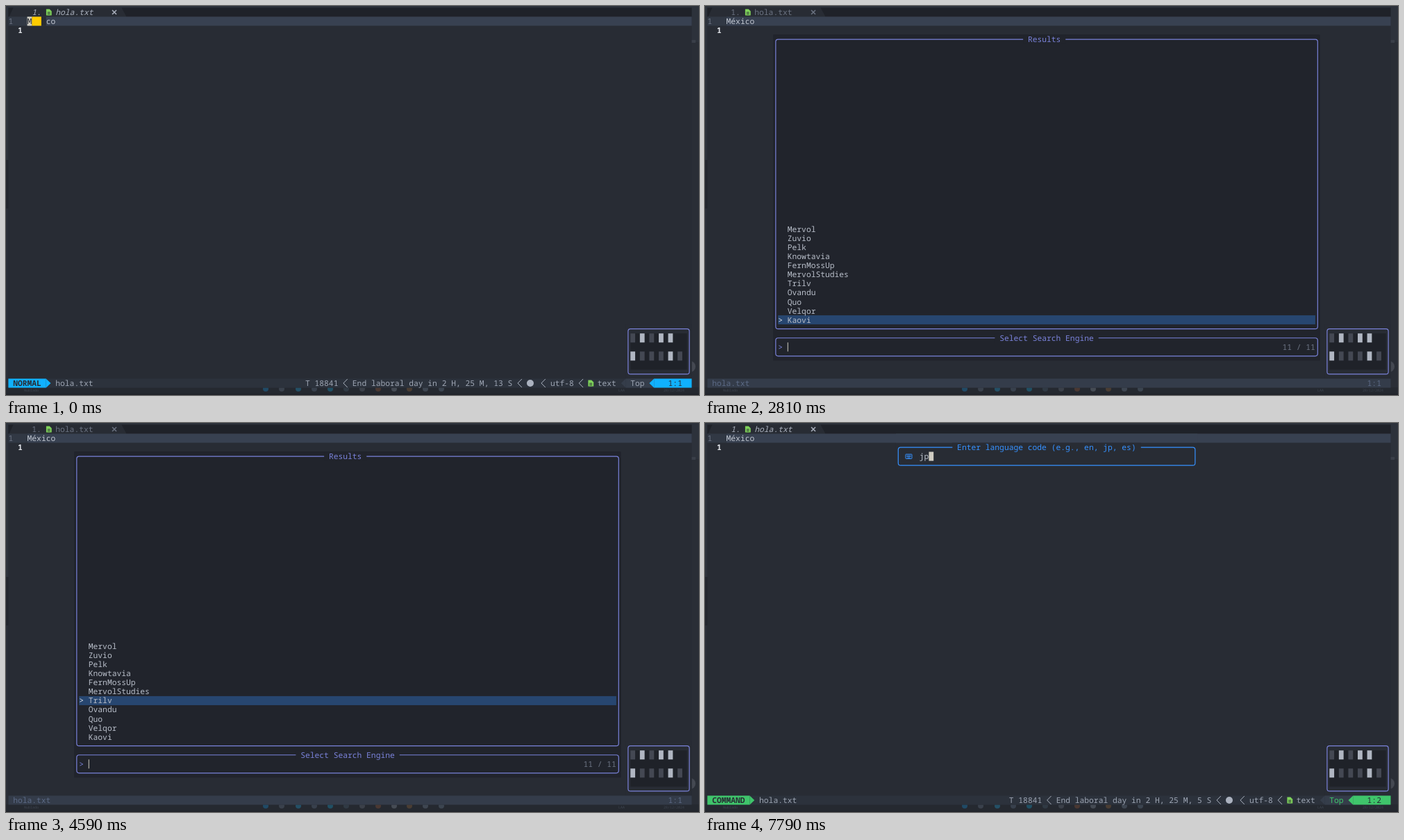
Recreate the animation shown at these times as an HTML page. Size 998x561 px, loop 8000 ms.

```html
<!DOCTYPE html>
<html lang="en">
<head>
<meta charset="utf-8">
<title>Editor search demo</title>
<style>
html, body { margin: 0; width: 100%; height: 100%; overflow: hidden; background: #282c34; }
svg { display: block; width: 998px; height: 561px; }
text {
  font: 11.3px "Noto Sans Mono", "DejaVu Sans Mono", monospace;
  font-weight: 500;
  text-rendering: geometricPrecision;
  white-space: pre;
}
</style>
</head>
<body>
<svg id="stage" viewBox="0 0 998 561" xmlns="http://www.w3.org/2000/svg"></svg>
<script>
const LOOP = 8000;
const CELL_W = 6.787, CELL_H = 13.05, LEFT = 3.4, TOP = 2.4;
const C = {
  bg: '#282c34', dark: '#21242c', tabs: '#1f2229', line: '#384151', bar: '#2c323c',
  fg: '#abb2bf', dim: '#6b7382', white: '#dfe2e7', pick: '#274670', cursor: '#cfccc2',
  cyan: '#10b1fe', purple: '#9f7efe', green: '#3fc56b', indigo: '#7a82da',
  blue: '#3691ff', orange: '#ff936a', leaf: '#7fd35a'
};
const MODE_COLOR = { NORMAL: C.cyan, VISUAL: C.purple, COMMAND: C.green };
const ENGINES = ['Mervol', 'Zuvio', 'Pelk', 'Knowtavia', 'FernMossUp', 'MervolStudies',
  'Trilv', 'Ovandu', 'Quo', 'Velqor', 'Kaovi'];
const PICK_TIMES = [4060, 4260, 4460, 4590, 4800, 4920, 5120];

const X = col => LEFT + col * CELL_W;
const Y = row => TOP + row * CELL_H;
const count = (times, t) => times.filter(s => t >= s).length;

const rect = (x, y, w, h, fill, extra = '') =>
  `<rect x="${x}" y="${y}" width="${w}" height="${h}" fill="${fill}" ${extra}/>`;
const cells = (col, row, w, h, fill) => rect(X(col), Y(row), w * CELL_W, h * CELL_H, fill);
const path = (d, fill, stroke = 'none', width = 1) =>
  `<path d="${d}" fill="${fill}" stroke="${stroke}" stroke-width="${width}"/>`;
const text = (col, row, str, fill, extra = '') =>
  `<text x="${X(col)}" y="${Y(row) + 10.5}" fill="${fill}" ${extra}>${str}</text>`;
const BOLD = 'style="font-weight:700"';
const ITALIC = 'style="font-style:italic"';

// Rounded border through cell centres, with a gap for the title.
function frame(c1, r1, c2, r2, color, title = '', titleCol = 0) {
  const box = rect(X(c1 + .5), Y(r1 + .5), (c2 - c1) * CELL_W, (r2 - r1) * CELL_H, 'none',
    `rx="3.5" stroke="${color}" stroke-width="1.2"`);
  if (!title) return box;
  const back = color === C.blue ? C.bg : C.dark;
  return box + cells(titleCol - 1, r1, title.length + 2, 1, back) + text(titleCol, r1, title, color);
}

function fileIcon(col, row) {
  const x = X(col) + .2, y = Y(row) + 2;
  return path(`M${x} ${y}h4.8l3 3v6h-7.8z`, C.leaf) +
    path(`M${x + 1.8} ${y + 4.8}h4M${x + 1.8} ${y + 7}h4`, 'none', C.bg, 1);
}

function chevron(col) {
  const x = X(col), y = Y(41);
  return path(`M${x + 6.5} ${y + .5}L${x + .6} ${y + 6.5}L${x + 6.5} ${y + 12.6}`, 'none', C.fg);
}

function arrowCap(col, color, dir) {
  const x = X(col), y = Y(41), base = dir > 0 ? x : x + CELL_W, tip = dir > 0 ? x + CELL_W : x;
  return path(`M${base} ${y}L${tip} ${y + CELL_H / 2}L${base} ${y + CELL_H}z`, color);
}

function desktop() {
  const icons = [['#204a66', 374], ['#3a414c', 397], ['#245066', 421], ['#38404c', 444], ['#205064', 467],
    ['#303a44', 490], ['#3b4049', 513], ['#4a3832', 536], ['#454b54', 559], ['#4a3d33', 581],
    ['#3e4651', 604], ['#3c4550', 627]];
  return rect(0, 0, 998, 561, '#2d323b') +
    rect(0, 222, 4, 70, '#23262e') + rect(0, 292, 4, 269, '#2a2e37') +
    rect(987, 52, 11, 509, '#2a2e36') + rect(987, 49, 6, 4, '#3a3f49') +
    rect(0, 550, 998, 11, '#252930') + rect(0, 559, 998, 2, '#20232a') +
    icons.map(([c, x]) => `<circle cx="${x}" cy="552" r="4" fill="${c}"/>`).join('') +
    '<g fill="#3f4651" font-size="5"><text x="26" y="556" style="font-size:5px">Nublado</text>' +
    '<text x="882" y="556" style="font-size:5px">LAA</text>' +
    '<text x="947" y="556" style="font-size:5px">28/12/2024</text></g>' +
    '<circle cx="985" cy="520" r="8" fill="#454952"/>' +
    cells(0, 0, 145, 42, C.bg);
}

function tabLine(active) {
  const color = active ? C.fg : C.dim, style = active ? ITALIC : '';
  const x = X(22) + .3, y = Y(0) + 3.6;
  return path('M3.4 2.4H10.5L4.5 15.4H3.4z', C.tabs) +
    path('M166.5 2.4H987.5V15.4H173.5z', C.tabs) +
    text(5, 0, '1.', color, style) + fileIcon(8, 0) + text(10, 0, 'hola.txt', color, style) +
    path(`M${x} ${y}l6 6m0 -6l-6 6`, 'none', color, 1.5);
}

function buffer(s) {
  let out = s.mode === 'VISUAL' ? '' : cells(4, 1, 141, 1, C.line) + cells(0, 1, 4, 1, '#313844');
  if (s.mode === 'VISUAL') {
    out += cells(4, 1, s.col - 1, 1, C.pick) + cells(3 + s.col, 1, 1, 1, C.cursor);
  } else if (s.mode === 'NORMAL') {
    out += cells(4, 1, 1, 1, C.cursor);
  }
  out += text(0, 1, '1', C.dim) + text(2, 2, '1', C.white, BOLD);
  [...'México'].forEach((ch, i) => {
    const underCursor = (s.mode === 'NORMAL' && i === 0) || (s.mode === 'VISUAL' && i === s.col - 1);
    out += text(4 + i, 1, ch, underCursor ? C.bg : '#c0c6d0');
  });
  // Shrinking cursor flash hides the letters beneath it.
  if (s.flash) {
    out += cells(5, 1, s.flash - 1, 1, '#ffcc00') + cells(4 + s.flash, 1, 1, 1, C.bg);
  }
  return out;
}

function minimap() {
  const row = (r, bits) => [...bits].map((b, i) =>
    cells(132 + 2 * i, r, 1, 1, b === '1' ? '#b0b6c2' : '#444853')).join('');
  return cells(131, 35, 14, 6, C.bg) + cells(132, 36, 12, 4, C.tabs) +
    frame(131, 35, 144, 40, C.indigo) + row(36, '01011') + row(38, '100010');
}

function statusLine(s) {
  if (s.picker) {
    return cells(0, 41, 145, 1, '#343c4a') + text(1, 41, 'hola.txt', '#5c6a85') + text(140, 41, '1:1', '#5c6a85');
  }
  const color = MODE_COLOR[s.mode], end = s.mode.length + 2;
  const clock = `End laboral day in 2 H, 25 M, ${s.seconds} S`;
  const start = 107 - clock.length;
  const grey = '#9da5b3';
  return cells(0, 41, 145, 1, C.bar) +
    cells(0, 41, end, 1, color) + arrowCap(end, color, 1) +
    text(1, 41, s.mode, C.bg, BOLD) + text(end + 2, 41, 'hola.txt', grey) +
    text(start - 10, 41, 'T 18841', grey) + chevron(start - 2) + text(start, 41, clock, grey) +
    chevron(108) + `<circle cx="${X(110) + 5}" cy="${Y(41) + 6.6}" r="5" fill="${C.fg}"/>` +
    chevron(113) + text(115, 41, 'utf-8', grey) + chevron(121) +
    fileIcon(123, 41) + text(125, 41, 'text', grey) +
    arrowCap(130, '#353d4a', -1) + cells(131, 41, 6, 1, '#353d4a') +
    text(132, 41, 'Top', s.mode === 'NORMAL' ? grey : color) +
    arrowCap(136, color, -1) + cells(137, 41, 8, 1, color) + text(140, 41, `1:${s.col}`, C.bg);
}

function hint(col, row, key, label) {
  const x = X(col + 2) + .5, y = Y(row) + 6.6;
  return text(col, row, key, C.orange) +
    path(`M${x} ${y}h9.5m-3.5 -3.5l3.5 3.5l-3.5 3.5`, 'none', C.indigo, 1.4) +
    text(col + 4, row, label, label[0] === '+' ? C.blue : C.cyan);
}

function keyHints(submenu) {
  const x = X(11) + 7, y = Y(40) + 5.5, bx = X(74), by = Y(40) + 2.5;
  return cells(0, 36, 145, 5, C.dark) +
    (submenu
      ? hint(5, 37, 's', 'Search selection') + hint(36, 37, 't', 'Translate selection') +
        hint(5, 38, 'e', 'Select search engine')
      : hint(5, 37, 'f', 'call CocAction("format")') + hint(36, 37, 'd', '+2 keymaps') +
        hint(5, 38, '/', 'Commentary') + hint(36, 38, 's', '+3 keymaps')) +
    text(2, 40, '+Visual »', C.blue) + path(`M${x} ${y}v3.2h7v-3.2`, 'none', C.blue, 1.2) +
    (submenu ? text(14, 40, 's', C.blue) : '') +
    `<text x="${X(64) - .6}" y="${Y(40) + 9}" fill="${C.orange}" style="font-size:6.2px;font-weight:700">ESC</text>` +
    text(67, 40, 'close', C.indigo) +
    path(`M${bx} ${by + 4}l3.5 -4h7v8h-7z`, C.orange) +
    path(`M${bx + 4.5} ${by + 2}l4 4m0 -4l-4 4`, 'none', C.dark) +
    text(76, 40, 'back', C.indigo);
}

function picker(selected) {
  const row = 24 + selected;
  return cells(14, 3, 116, 36, C.dark) + rect(98.4, Y(3) - 0.5, 786.5, 469.5, C.dark) +
    frame(14, 3, 129, 35, C.indigo, 'Results', 68) +
    cells(15, row, 114, 1, C.pick) + text(15, row, '&gt;', C.white) +
    ENGINES.map((name, i) => text(17, 24 + i, name, '#b8bec9')).join('') +
    frame(14, 36, 129, 38, C.indigo, 'Select Search Engine', 62) +
    text(15, 37, '&gt;', C.indigo) + rect(X(17), Y(37), 1, CELL_H, C.cursor) +
    text(122, 37, '11 / 11', C.dim);
}

function languagePrompt(typed) {
  const x = X(42), y = Y(3) + 3;
  return cells(40, 2, 64, 3, C.bg) + cells(40, 1, 64, 1, C.line) +
    frame(40, 2, 103, 4, C.blue, 'Enter language code (e.g., en, jp, es)', 53) +
    rect(x + .5, y + .5, 9, 6.4, 'none', `stroke="${C.blue}" rx=".6"`) +
    path(`M${x + 2} ${y + 2.4}h6M${x + 2} ${y + 4}h6M${x + 3} ${y + 5.6}h4`, 'none', C.blue, .9) +
    text(45, 3, typed, '#c0c6d0') + cells(45 + typed.length, 3, 1, 1, C.cursor);
}

function stateAt(t) {
  const visual = t >= 950 && t < 2810;
  const prompt = t >= 5740;
  return {
    mode: prompt ? 'COMMAND' : visual ? 'VISUAL' : 'NORMAL',
    col: prompt ? 2 : visual ? Math.min(7, 2 + Math.floor((t - 950) / 94)) : 1,
    seconds: 13 - Math.floor((t + 605) / 1000),
    flash: 3 - count([70, 135, 200], t),
    hints: t >= 1870 && t < 2810,
    submenu: t >= 2480,
    picker: t >= 2810 && t < 5670,
    selected: 10 - count(PICK_TIMES, t),
    prompt,
    typed: 'jp'.slice(0, count([7590, 7790], t))
  };
}

function draw(s) {
  const bufferState = s.picker ? { ...s, mode: 'INACTIVE' } : s;
  return desktop() + tabLine(!s.picker) + buffer(bufferState) + minimap() +
    (s.hints ? keyHints(s.submenu) : '') +
    (s.picker ? picker(s.selected) : '') +
    (s.prompt ? languagePrompt(s.typed) : '') +
    statusLine(s);
}

const stage = document.getElementById('stage');
const origin = performance.now();
let shown = '';

function tick() {
  const state = stateAt((performance.now() - origin) % LOOP);
  const key = JSON.stringify(state);
  if (key !== shown) {
    shown = key;
    stage.innerHTML = draw(state);
  }
  requestAnimationFrame(tick);
}
tick();
</script>
</body>
</html>
```
